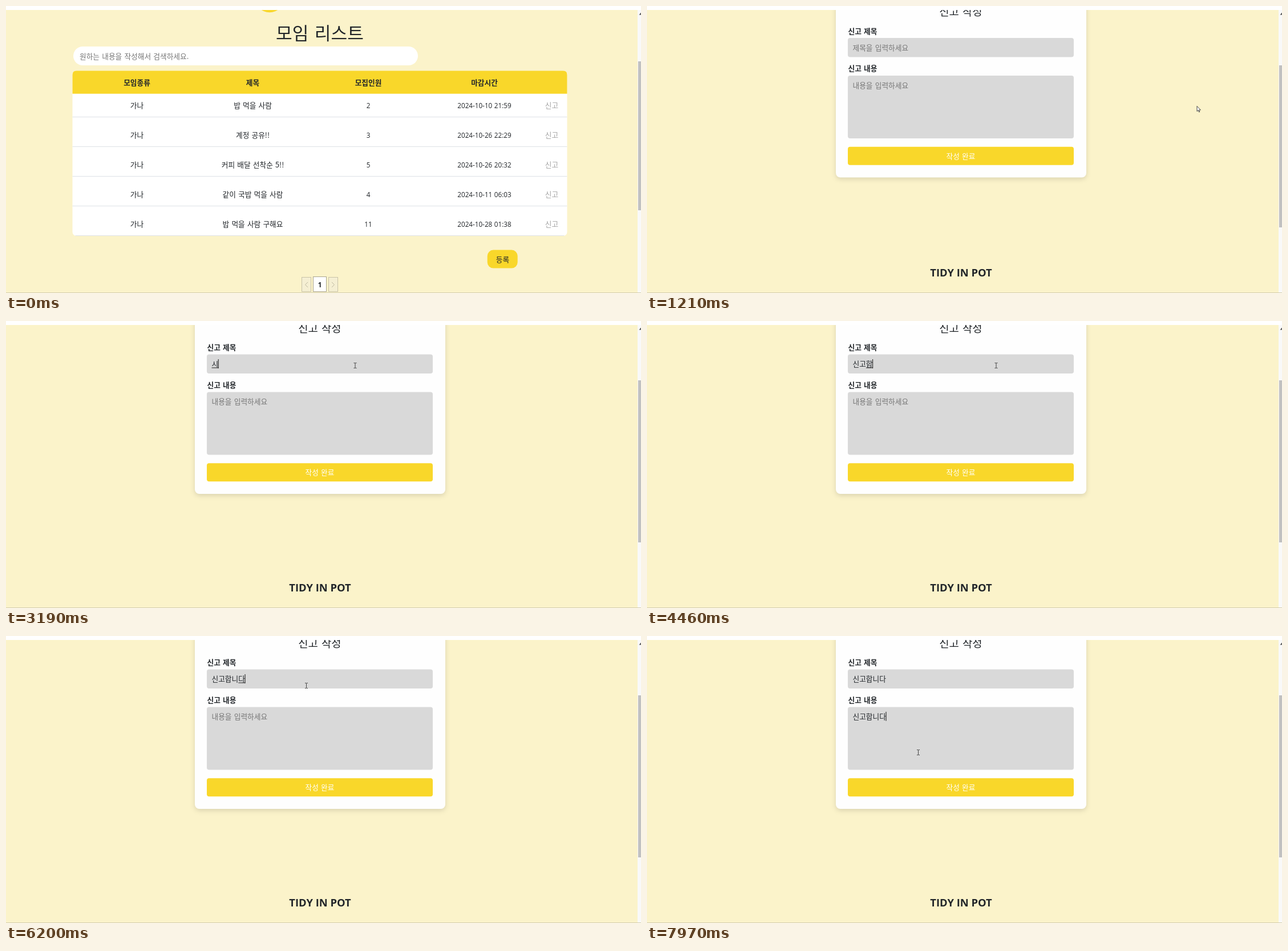
An HTML page that plays this animation: 1113x503 px, repeating every 8 s.

```html
<!DOCTYPE html>
<html lang="ko">
<head>
<meta charset="utf-8">
<title>모임 리스트</title>
<style>
  html, body { margin: 0; width: 100%; height: 100%; overflow: hidden; background: #fbf3ca; }
  svg { display: block; width: 1113px; height: 503px; }
  text {
    font: 400 12.7px "Noto Sans CJK KR", "Noto Sans CJK", "Noto Sans KR", sans-serif;
    word-spacing: .05em; fill: #212529; white-space: pre;
  }
  .mid { text-anchor: middle; }
  .bold { font-weight: 700; }
  .head { font-size: 31.2px; font-weight: 350; }
  .sub { font-size: 18.8px; font-weight: 350; }
  .num { font-family: "Open Sans", "Noto Sans", sans-serif; font-size: 11.7px; }
  .hint { fill: #757575; }
  .pale { fill: #a3a3a3; }
  .white { fill: #fff; }
  .brand { font: 700 18.4px "Open Sans", "Noto Sans", sans-serif; word-spacing: 0; }
  #card { filter: drop-shadow(0 3px 4px rgba(0, 0, 0, .13)); }
</style>
</head>
<body>
<svg id="stage" viewBox="0 0 1113 503">
  <rect width="1113" height="503" fill="#fbf3ca"/>
  <g id="list"></g>
  <g id="form"></g>
  <rect width="1113" height="7" fill="#fff"/>
  <rect x="1107" y="7" width="6" height="496" fill="#f9f9f9"/>
  <rect id="thumb" x="1108" width="5" fill="#c1c1c1"/>
  <path d="M1109.5 15.5L1113 11.5V15.5Z" fill="#505050"/>
  <rect y="502" width="1113" height="1" fill="#d3cdae"/>
  <g id="pointer">
    <circle id="halo" r="9" fill="#fcf450" opacity=".75"/>
    <path id="arrow" d="M.5 .5V9.6L2.6 7.7 4.1 11 5.4 10.4 4 7.2H6.9Z" fill="#fff" stroke="#333" stroke-width=".9"/>
    <path id="hand" d="M-1 .5Q0-.8 1 .5V5L4.6 5.8Q6.2 6.2 6 8L5 11.5V13.5H-1V11.5L-4 7.8Q-4-.1-1 8Z"
      fill="#fff" stroke="#333" stroke-width=".9" stroke-linejoin="round"/>
    <path id="beam" d="M-2.5-4.5H-.6L0-4 .6-4.5H2.5M0-4V4M-2.5 4.5H-.6L0 4 .6 4.5H2.5" fill="none" stroke="#444"/>
  </g>
</svg>
<script>
const $ = id => document.getElementById(id);
const YELLOW = '#f9d72a', DARK = '#212529';
const LOOP = 8000, LEFT = 360.5, STEP = 11.7;

function add(parent, tag, attrs) {
  const el = document.createElementNS('http://www.w3.org/2000/svg', tag);
  for (const k in attrs) el.setAttribute(k, attrs[k]);
  return parent.appendChild(el);
}
const rect = (p, x, y, width, height, fill, rx = 0, more) =>
  add(p, 'rect', { x, y, width, height, fill, rx, ...more });
// y is the middle of the glyphs
function label(p, x, y, str, cls = '') {
  const el = add(p, 'text', { x, y, dy: '.38em', class: cls });
  el.textContent = str;
  return el;
}

function buildList(g) {
  add(g, 'circle', { cx: 462, cy: -14.5, r: 25.8, fill: YELLOW });
  label(g, 550, 47.5, '모임 리스트', 'mid head');
  rect(g, 118, 71, 604, 33, '#fff', 16.5);
  label(g, 129, 88, '원하는 내용을 작성해서 검색하세요.', 'hint');

  rect(g, 116.5, 113.5, 867, 289.5, '#fff', 7);
  add(g, 'path', { d: 'M116.5 153.7V120.5q0-7 7-7h853q7 0 7 7V153.7Z', fill: YELLOW });
  const cols = [229.5, 432.5, 635, 838.5];
  ['모임종류', '제목', '모집인원', '마감시간'].forEach((s, i) => label(g, cols[i], 133.7, s, 'mid bold'));
  const rows = [
    ['밥 먹을 사람', '2', '2024-10-10 21:59'],
    ['계정 공유!!', '3', '2024-10-26 22:29'],
    ['커피 배달 선착순 5!!', '5', '2024-10-26 20:32'],
    ['같이 국밥 먹을 사람', '4', '2024-10-11 06:03'],
    ['밥 먹을 사람 구해요', '11', '2024-10-28 01:38']
  ];
  rows.forEach(([title, count, due], i) => {
    const y = 174.2 + i * 51.9;
    label(g, cols[0], y, '가나', 'mid');
    label(g, cols[1], y, title, 'mid');
    label(g, cols[2], y + .5, count, 'mid num');
    label(g, cols[3], y + .5, due, 'mid num');
    label(g, 956.5, y, '신고', 'mid pale');
    const inset = i === 4 ? 5 : 0;
    rect(g, 116.5 + inset, 194 + i * 52, 867 - 2 * inset, 1, '#dee2e6');
  });

  rect(g, 843.7, 427.6, 53, 32, YELLOW, 10.5);
  label(g, 870.5, 443.8, '등록', 'mid');

  const edge = { stroke: '#c9c3a8' };
  rect(g, 518.5, 475.5, 16, 25, '#f5efd3', 0, edge);
  rect(g, 565.5, 475.5, 16, 25, '#f5efd3', 0, edge);
  rect(g, 538.5, 474.5, 23, 26, '#fff', 0, { stroke: '#aaa58f' });
  add(g, 'path', { d: 'M529 484L524.5 488.5 529 493M571 484L575.5 488.5 571 493', fill: 'none', stroke: '#bdb89f' });
  label(g, 550, 488.5, '1', 'mid bold num');
}

// A text field: placeholder, value, selection, composing underline and caret
function field(g, y, height, mid, hint) {
  rect(g, 352, y, 396, height, '#d9d9d9', 4);
  const ph = label(g, LEFT, mid, hint, 'hint');
  const sel = rect(g, LEFT, mid - 8.5, 0, 16, '#0078d7');
  const txt = label(g, LEFT, mid, '');
  const plain = add(txt, 'tspan', { fill: DARK }), lit = add(txt, 'tspan', { fill: '#fff' });
  const under = rect(g, LEFT, mid + 6, STEP, 1, '#222');
  const caret = rect(g, LEFT, mid - 8.5, 1, 16, '#111');
  return ({ value, composing, blink, from = value.length }) => {
    const n = value.length;
    ph.style.display = n ? 'none' : '';
    plain.textContent = value.slice(0, from);
    lit.textContent = value.slice(from);
    sel.setAttribute('x', LEFT + from * STEP);
    sel.setAttribute('width', (n - from) * STEP);
    under.setAttribute('x', LEFT + (n - 1) * STEP);
    under.style.display = composing && n ? '' : 'none';
    caret.setAttribute('x', LEFT - .5 + n * STEP);
    caret.style.display = blink ? '' : 'none';
  };
}

function buildForm(g) {
  rect(g, 331, -40, 439, 343, '#fefefe', 8, { id: 'card' });
  label(g, 550, 12.5, '신고 작성', 'mid sub');
  label(g, 352.5, 46.3, '신고 제목', 'bold');
  label(g, 352.5, 112, '신고 내용', 'bold');
  rect(g, 352, 249.3, 396, 32, YELLOW, 4);
  label(g, 550, 265.3, '작성 완료', 'mid white');
  return [
    field(g, 58.5, 33.5, 75.5, '제목을 입력하세요'),
    field(g, 124.5, 110, 141.3, '내용을 입력하세요')
  ];
}

buildList($('list'));
const [showTitle, showBody] = buildForm($('form'));
label($('form'), 550.5, 467, 'TIDY IN POT', 'mid brand').id = 'brand';
$('stage').insertBefore($('brand'), $('pointer'));

// Tables of [time, value]; each value holds until the next entry
const typed = [
  [0, ''], [3070, 'ㅅ'], [3170, '시'], [3270, '신'], [3370, '신ㄱ'], [3460, '신고'],
  [3990, '신고ㅎ'], [4190, '신고하'], [4460, '신고합'], [4720, '신고합ㄴ'],
  [4780, '신고합니'], [4920, '신고합니ㄷ'], [4990, '신고합니다']
];
const blinks = [[0, 0], [2140, 1], [2670, 0], [3070, 1], [5520, 0], [6050, 1], [6400, 0]];
const halos = [[0, 0], [1050, 1], [1210, 0], [2140, 1], [2270, 0], [6340, 1], [6640, 0], [7580, 1], [7710, 0]];
const at = (table, t) => table.filter(e => e[0] <= t).pop()[1];

// Pointer moves: start, end, number of steps, target x, y
const moves = [
  [120, 910, 11, 963, 179],
  [980, 980, 1, 963.5, 175],
  [1450, 2070, 9, 612, 78],
  [5850, 6200, 6, 526.5, 87],
  [6270, 6340, 2, 440, 85],
  [6400, 6500, 2, 343, 81],
  [6640, 6840, 4, 449, 128],
  [7370, 7580, 4, 469, 199],
  [7770, 7840, 2, 475.5, 204]
];

function pointerAt(t) {
  let x = 1098, y = 512;
  for (const [start, end, n, tx, ty] of moves) {
    if (t < start) break;
    const k = n < 2 ? 1 : Math.min(n, Math.floor((t - start) / (end - start) * (n - 1) + 1e-6) + 1);
    const p = k / n, e = p * p * (3 - 2 * p);
    x += (tx - x) * e;
    y += (ty - y) * e;
  }
  return [x, y];
}

const show = (id, on) => { $(id).style.display = on ? '' : 'none'; };

function draw(t) {
  const onForm = t >= 1210;
  show('list', !onForm);
  show('form', onForm);
  show('brand', onForm);
  $('form').setAttribute('transform', `translate(0 ${t < 1290 ? -2.5 : 0})`);
  $('thumb').setAttribute('y', onForm ? 104 : 97);
  $('thumb').setAttribute('height', onForm ? 284 : 261);

  const [x, y] = pointerAt(t);
  const dragging = t >= 6340 && t < 6640;
  const inField = x > 352 && x < 748 && (y > 58 && y < 92 || y > 124 && y < 235);
  const beam = onForm && (inField || dragging);
  const hand = t >= 980 && !onForm;
  show('pointer', t >= 120);
  $('pointer').setAttribute('transform', `translate(${x.toFixed(1)} ${y.toFixed(1)})`);
  show('beam', beam);
  show('hand', hand);
  show('arrow', !beam && !hand);
  show('halo', at(halos, t));

  const value = at(typed, t);
  let from = value.length;
  if (t >= 6400 && t < 7580) {
    from = t < 6640 ? Math.max(0, Math.min(from, Math.round((x - LEFT) / STEP))) : 0;
  }
  showTitle({ value, from, composing: t < 6340, blink: at(blinks, t) });
  showBody({ value: t >= 7970 ? '신고합니다' : '', composing: false, blink: t >= 7580 });
}

const begin = performance.now();
function tick() {
  draw((performance.now() - begin) % LOOP);
  requestAnimationFrame(tick);
}
tick();
</script>
</body>
</html>
```
